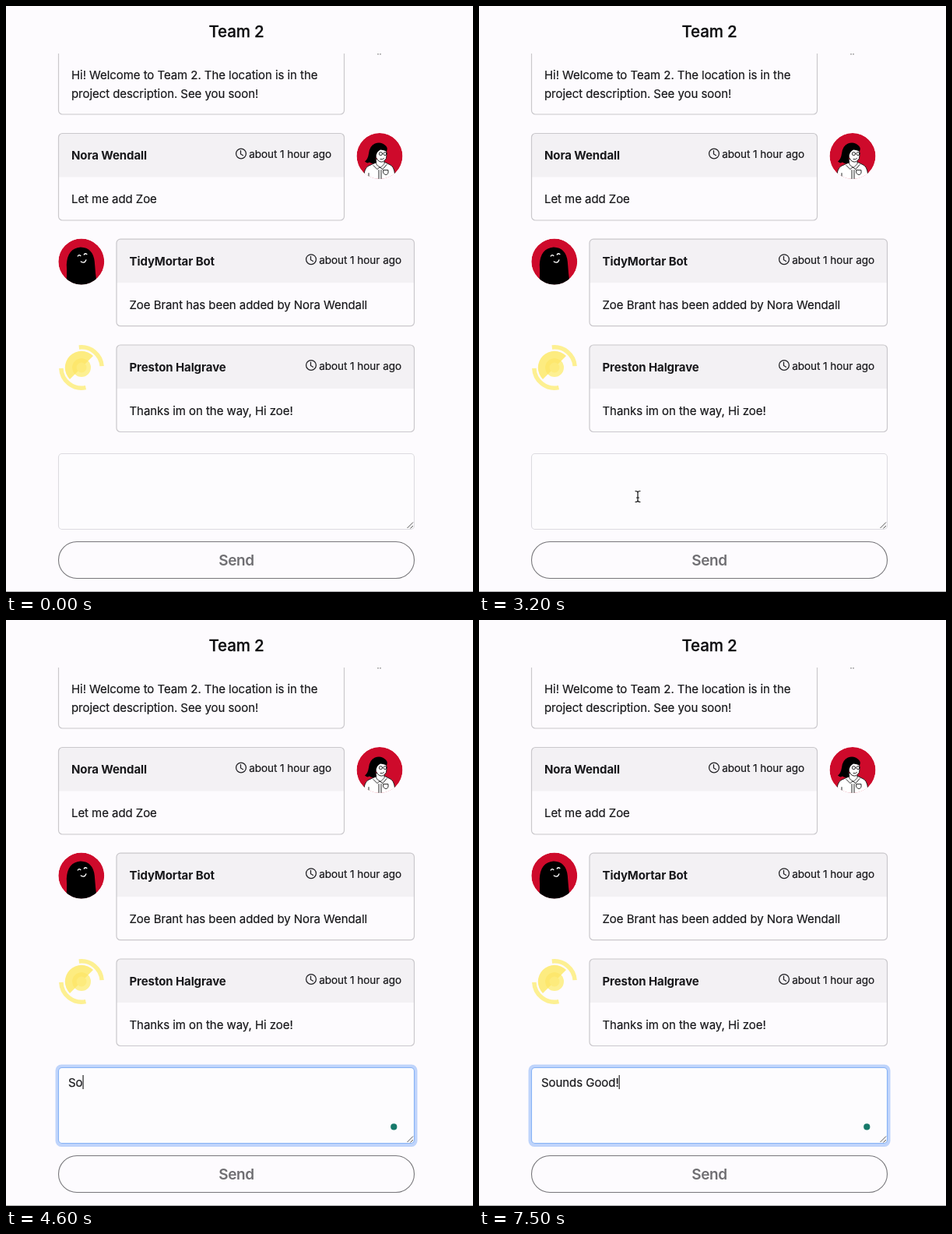
Write an HTML page that moves like this. It is 600 px wide and 752 px high and loops after 8000 ms.

```html
<!DOCTYPE html>
<html lang="en">
<head>
<meta charset="utf-8">
<title>Team chat</title>
<style>
  html, body { margin: 0; width: 100%; height: 100%; overflow: hidden; background: #fdfbfe; }
  svg { display: block; width: 600px; height: 752px; }
  text { font: 400 15px Inter, Roboto, sans-serif; letter-spacing: -0.06px; fill: #18181b; stroke: #18181b; stroke-width: .2; white-space: pre; }
  .title { font-size: 20.5px; font-weight: 500; letter-spacing: -0.15px; fill: #0b0b0d; stroke-width: .3; }
  .name { font-weight: 700; letter-spacing: -0.1px; stroke: none; }
  .time { font-size: 13.5px; letter-spacing: -0.03px; }
  .send { font-size: 19px; font-weight: 600; letter-spacing: -0.4px; fill: #6f6e72; stroke: none; }
  .mid { text-anchor: middle; }
  .end { text-anchor: end; }
  .edge { fill: none; stroke: #cac8cc; stroke-width: 1.2; }
  .ink { fill: none; stroke: #111; stroke-width: .9; stroke-linecap: round; stroke-linejoin: round; }
</style>
</head>
<body>
<svg viewBox="0 0 600 752">
  <defs>
    <clipPath id="round"><circle r="29.5"/></clipPath>
    <clipPath id="list"><rect y="61" width="600" height="500"/></clipPath>
  </defs>
  <rect width="600" height="752" fill="#fdfbfe"/>
  <text class="title mid" x="296" y="40">Team 2</text>

  <g clip-path="url(#list)">
    <rect class="edge" x="67.5" y="20" width="367" height="119" rx="5"/>
    <path d="M478 61v1.5M481 61v1.5" stroke="#555"/>
  </g>
  <text x="84" y="94">Hi! Welcome to Team 2. The location is in the</text>
  <text x="84" y="117.5">project description. See you soon!</text>
  <g id="cards"></g>

  <g transform="translate(480 192.6)" clip-path="url(#round)">
    <circle r="29.5" fill="#ce0a2b"/>
    <path d="M-21 30Q-20 16-15 13L-4 8H7L15 12Q20 16 20 30Z" fill="#fff" stroke="#111" stroke-width=".9"/>
    <path d="M-5 4L-4 11L1 15L6 10V5Z" fill="#fff" stroke="#111" stroke-width=".8"/>
    <path d="M-6-8Q0-11 8-9Q10-4 8.5 3Q5 9 0 7Q-6 4-6-8Z" fill="#fff" stroke="#111" stroke-width=".9"/>
    <path d="M-19 7Q-15 4-14-3Q-13-13-6-16Q2-19 8-13Q11-10 9-6Q4-8 1-8Q-3-6-4-2Q-6 3-4 8Q-9 11-13 8Q-16 10-19 7Z"/>
    <g class="ink">
      <circle cx="1.5" cy="-3" r="2.1"/><circle cx="7" cy="-3" r="2"/>
      <path d="M1 4Q4 5 5.5 3M-8 12L-3 17L0 14L4 17L9 11M-1 18V30M2 18V30M-14 22V30"/>
      <path d="M5 18H11V22Q8 26 5 22Z"/>
    </g>
  </g>

  <g transform="translate(96.8 328)" clip-path="url(#round)">
    <circle r="29.5" fill="#ce0a2b"/>
    <path d="M-20 30Q-18 18-19 4Q-18-17-1-18.5Q15-18 17 0Q18 15 20 30Z"/>
    <path d="M-4.5-7Q-3-9.5-1-7.5M3.5-9Q5-11 7-9.5M-.5 0Q4 3 6-2" fill="none" stroke="#fff" stroke-width="1.4" stroke-linecap="round"/>
  </g>

  <g transform="translate(97 464)" fill="none">
    <g id="arcs" stroke="#fdf092" stroke-width="5.5"></g>
    <path d="M-15 15A21 21 0 0 1 15-15Z" fill="#fdec80"/>
    <circle r="12" fill="#fdf092"/>
    <path d="M-8.5 8.5A12 12 0 0 1 8.5-8.5Z" fill="#fde76d"/>
    <circle r="6.5" fill="#fdeb7c"/>
  </g>

  <rect id="ring" x="63.5" y="570.5" width="465" height="105.5" rx="7.5" fill="#bfd4fb"/>
  <rect id="field" x="67.5" y="574.5" width="457" height="97" rx="4.5" fill="#fdfcfe" stroke-width="1.1"/>
  <path d="M515.5 670L523 662.5M519.5 670.5L523 667" stroke="#555" stroke-width="1"/>
  <text id="typed" x="80" y="598.5"></text>
  <rect id="caret" y="584" width="1.1" height="18" fill="#111"/>
  <circle id="dot" cx="498.3" cy="650.4" r="4.1" fill="#16796a"/>

  <rect x="67.5" y="687.5" width="457" height="47" rx="23.5" fill="none" stroke="#77767a" stroke-width="1.1"/>
  <text class="send mid" x="296" y="718">Send</text>
  <path d="M0 751.5H600" stroke="#a9a8ab"/>

  <g id="pointer" stroke-linejoin="round" stroke-linecap="round">
    <path id="hand" d="M-1.5 1Q0-1 1.5 1L3 6Q5 4.5 6 6.2Q8 5 9 7Q11 6 11.5 8.5L11.5 12L9.5 17H2.5L-3.5 10.5Q-4 8 0 9Z M4 10.5V14M6.3 10.5V14M8.6 10.5V14" fill="#fff" stroke="#111" stroke-width="1.1"/>
    <path id="arrow" d="M0 0V14L3.3 11L5.5 16L8 15L5.8 10H10Z" fill="#111" stroke="#fff"/>
    <path id="beam" d="M-3-7Q0-7 0-5Q0-7 3-7M0-5V5M-3 7Q0 7 0 5Q0 7 3 7M-1.5 1.5H1.5" fill="none" stroke="#111" stroke-width="1.2"/>
  </g>
</svg>
<script>
const LOOP = 8000;
const MESSAGE = "Sounds Good!";
const KEY_TIMES = [3800, 4500, 4800, 5000, 5300, 5400, 5700, 6100, 6400, 6600, 6800, 7500];
const $ = id => document.getElementById(id);
const show = (id, on) => $(id).setAttribute("visibility", on ? "visible" : "hidden");

function card(left, right, top, name, body) {
  const width = right - left, clockX = right - 132.5, clockY = top + 26;
  return `
    <path d="M${left} ${top + 56}v-51q0-5 5-5h${width - 10}q5 0 5 5v51z" fill="#f3f1f4"/>
    <rect class="edge" x="${left}" y="${top}" width="${width}" height="111.5" rx="5"/>
    <text class="name" x="${left + 16.5}" y="${top + 33.5}">${name}</text>
    <g fill="none" stroke="#202024" stroke-width="1.25" stroke-linecap="round">
      <circle cx="${clockX}" cy="${clockY}" r="6.4"/>
      <path d="M${clockX - .5} ${clockY - 3.9}v4.4l3 1.8"/>
    </g>
    <text class="time end" x="${right - 16.5}" y="${top + 31.5}">about 1 hour ago</text>
    <text x="${left + 16.5}" y="${top + 89.5}">${body}</text>`;
}

function arc(radius, from, to) {
  const point = deg => {
    const a = deg * Math.PI / 180;
    return `${radius * Math.cos(a)} ${radius * Math.sin(a)}`;
  };
  return `<path d="M${point(from)}A${radius} ${radius} 0 0 1 ${point(to)}"/>`;
}

$("cards").innerHTML =
  card(67.5, 434.5, 163.5, "Nora Wendall", "Let me add Zoe") +
  card(142, 524.5, 299.2, "TidyMortar Bot", "Zoe Brant has been added by Nora Wendall") +
  card(142, 524.5, 435, "Preston Halgrave", "Thanks im on the way, Hi zoe!");
$("arcs").innerHTML = arc(26.2, -97, -4) + arc(26.2, 78, 178);

function drawPointer(t) {
  const u = Math.min(1, Math.max(0, (Math.floor(t / 100) - 27) / 5));
  const ease = 1 - (1 - u) ** 2;
  const x = 182 + 22 * ease, y = 695 - 65.5 * ease;
  const kind = y > 687 ? "hand" : y > 672 ? "arrow" : "beam";
  const visible = t >= 2700 && t < 3800;
  for (const id of ["hand", "arrow", "beam"]) show(id, visible && id === kind);
  $("pointer").setAttribute("transform", `translate(${x} ${y})`);
}

function draw(t) {
  const focused = t >= 3400;
  const typed = $("typed");
  typed.textContent = MESSAGE.slice(0, KEY_TIMES.filter(k => k <= t).length);
  $("caret").setAttribute("x", 80 + typed.getComputedTextLength());
  show("caret", focused && !(t >= 7300 && t < 7500));
  show("ring", focused);
  show("dot", t >= 3800);
  $("field").setAttribute("stroke", focused ? "#86b2f5" : "#dcdbe0");
  drawPointer(t);
}

const start = performance.now();
function tick() {
  draw((performance.now() - start) % LOOP);
  requestAnimationFrame(tick);
}
tick();
</script>
</body>
</html>
```
